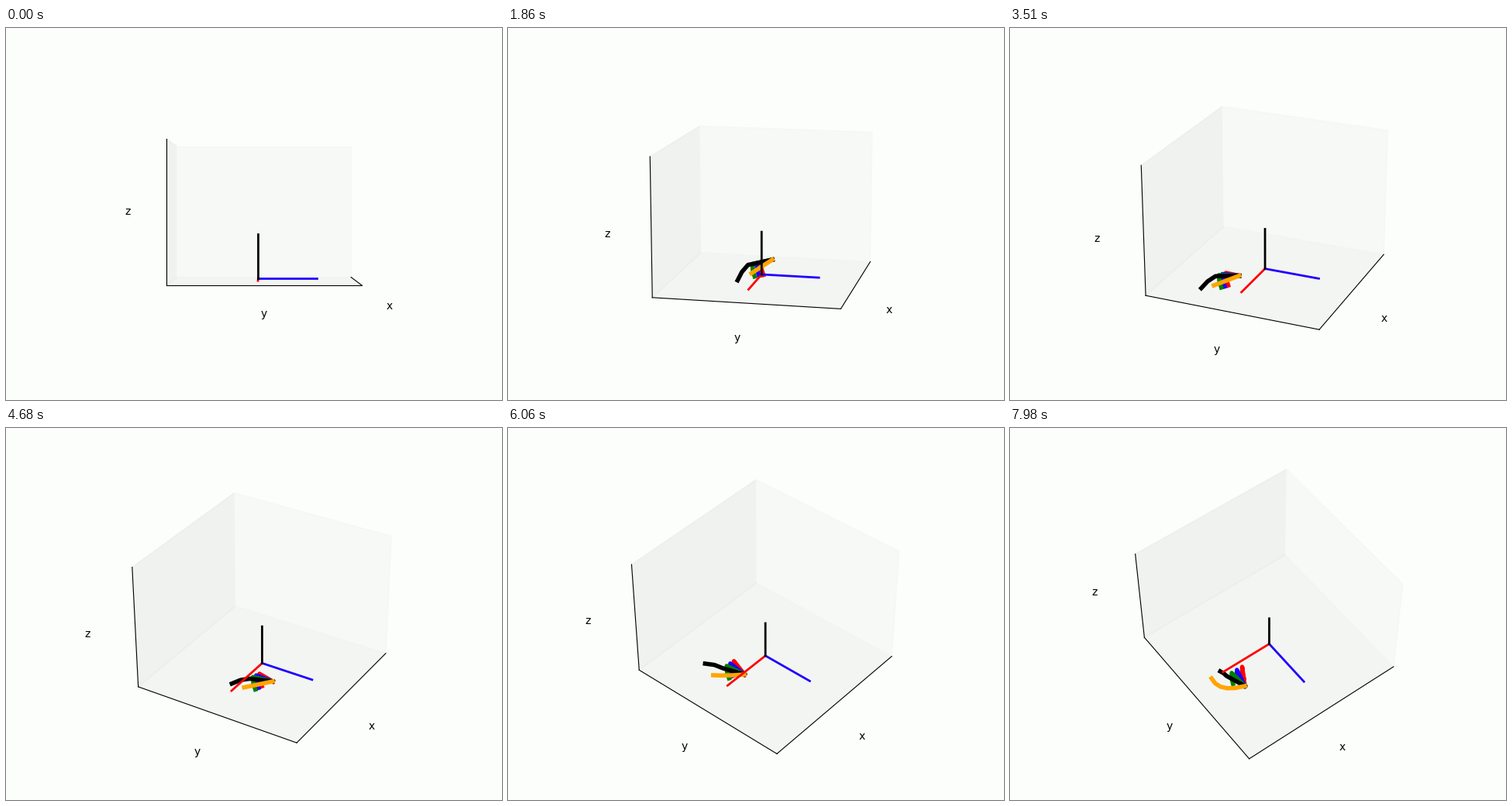
Recreate the animation shown at these times as a matplotlib script. Size 640 by 480 pixels, loop 8000 ms.

```python
import numpy as np
import matplotlib.pyplot as plt
from matplotlib.animation import FuncAnimation
from matplotlib.lines import Line2D

W, H = 640, 480
LOOP, TICK, HOLD = 8000, 20, 30   # ms: loop, drawing interval, time per pose
BG, BLUE = "#fcfefc", "#1f00ff"

# Wrist path on the stage, in pixels
STEPS = [62, 117, 156, 202, 242, 266]
WRIST_X = [341, 295, 344, 305, 305, 303]
WRIST_Y = [299, 320, 327, 318, 327, 333]

# Finger colours with their lengths, from index to little finger
FINGERS = {"red": 0.55, BLUE: 0.9, "green": 1, "black": 1}

fig = plt.figure(figsize=(W / 100, H / 100), dpi=100, facecolor=BG)
ax = fig.add_subplot(projection="3d", facecolor=BG)
ax.set(xlim=(-1.4625, 1.6625), ylim=(-1.4625, 1.6625), zlim=(-0.0625, 3.0625),
       xticks=[], yticks=[], zticks=[], xlabel="x", ylabel="y", zlabel="z")
for axis, grey in zip((ax.xaxis, ax.yaxis, ax.zaxis), (0.95, 0.90, 0.925)):
    axis.set_pane_color((grey - 0.004, grey + 0.01, grey - 0.004, 0.5))

for end, color in zip(np.eye(3), ["red", BLUE, "black"]):
    ax.plot(*np.outer(end, [0, 1]), color=color, lw=2, zorder=5)

hand = [ax.add_artist(Line2D([], [], color=color, lw=4, zorder=3, clip_on=False,
                             transform=fig.transFigure))
        for color in [*FINGERS, "orange"]]


def polar(length, angle):
    """Offset pointing left, turned upwards by the angle in degrees."""
    a = np.radians(angle)
    return -length * np.array([np.cos(a), np.sin(a)])


def ramp(x, start, stop):
    return np.clip((x - start) / (stop - start), 0, 1)


def ease(t):
    return t * t * (3 - 2 * t)


def curve(joint, tip, n=6):
    """Rounded path from the wrist through the joint to the tip."""
    t = np.linspace(0, 1, n)[:, None]
    return 4 * t * (1 - t) * joint + t * (2 * t - 1) * tip


def hand_paths(step):
    wrist = np.array([np.interp(step, STEPS, WRIST_X), np.interp(step, STEPS, WRIST_Y)])
    u = ramp(step, STEPS[0], STEPS[-1])

    # The palm turns while the little finger swings out and folds at the end
    index = polar(15 + 10 * u, -14 + 96 * u)
    little = polar(32 - 5 * u, -12 + 41 * u)
    swing = polar(24 - 14 * ease(ramp(step, 242, 266)), -56 + 92 * ease(u))

    # The other fingers stay curled except for one short stretch
    stretch = np.exp(-((step - 242) / 14) ** 2)
    paths = []
    for k, length in enumerate(FINGERS.values()):
        knuckle = index + (little - index) * k / 3
        curled, spread = np.array([3, 16]), length * np.array([-22, -19])
        bone = swing if k == 3 else curled + (spread - curled) * stretch
        side = np.array([-bone[1], bone[0]]) * 0.06
        paths.append(np.array([[0, 0], knuckle, knuckle + bone / 2 + side, knuckle + bone]))

    thumb = polar(32 + 12 * u, -33 + 46 * u)
    bow = np.array([-6, 7]) * u ** 6
    paths.append(curve(thumb / 2 + bow, thumb))
    return [wrist + p for p in paths]


def update(i):
    step = i * TICK // HOLD
    ax.view_init(elev=0.2 * step, azim=0.2 * step)
    for line, path in zip(hand, hand_paths(step)):
        line.set_data(path[:, 0] / W, 1 - path[:, 1] / H)
        line.set_visible(step > 0)
    return hand


anim = FuncAnimation(fig, update, frames=LOOP // TICK, interval=TICK,
                     init_func=lambda: update(0), repeat=True, repeat_delay=0)
plt.show()
```
